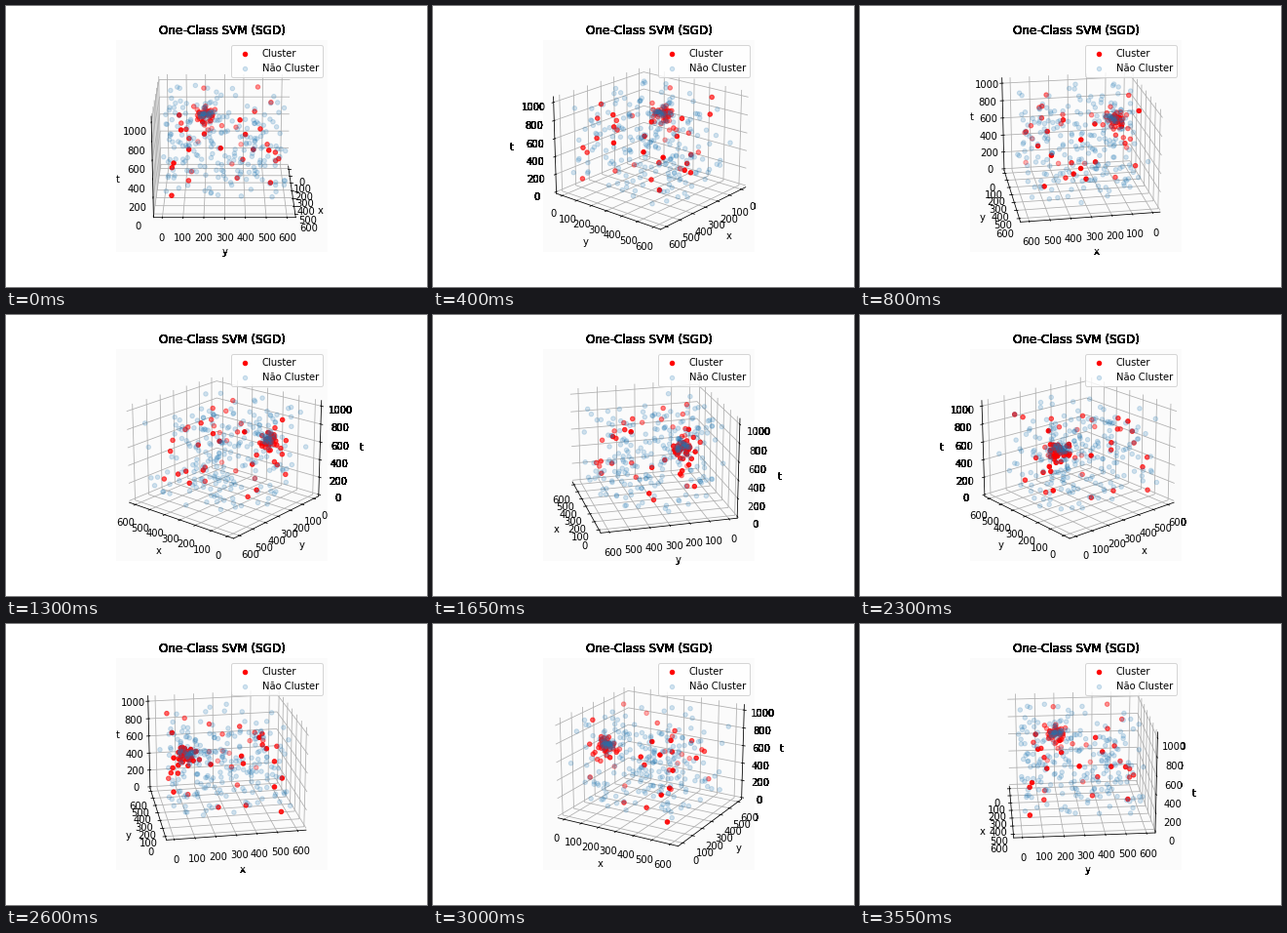
These frames come from a looping animation (432 by 288 pixels, 3.6 s). A matplotlib script:

```python
import numpy as np
import matplotlib.pyplot as plt
from matplotlib.animation import FuncAnimation
from mpl_toolkits.mplot3d import Axes3D

FRAMES = 72
STEP = 360 / FRAMES
ELEV = 20
BOLD_PASSES = 14


class BoldEdgeAxes(Axes3D):
    """3D axes whose text turns bold where it leaves the background box."""

    def draw(self, renderer):
        inner = [*self.collections, self.get_legend()]
        for artist in inner:
            artist.set_visible(False)
        super().draw(renderer)
        # Stack the text; the next full draw covers what lies inside the box.
        for text in self.edge_texts() * BOLD_PASSES:
            text.draw(renderer)
        for artist in inner:
            artist.set_visible(True)
        super().draw(renderer)

    def edge_texts(self):
        texts = [self.title]
        for axis in (self.xaxis, self.yaxis, self.zaxis):
            texts.append(axis.label)
            texts += [tick.label1 for tick in axis.majorTicks]
        return texts


def make_points(rng):
    core = rng.normal((100, 200, 700), (25, 25, 50), (30, 3))
    halo = rng.normal((105, 200, 660), (38, 38, 105), (16, 3))
    strays = rng.uniform((15, 15, 100), (585, 585, 1000), (34, 3))
    noise = rng.uniform((2, 2, 30), (598, 598, 1000), (215, 3))
    mixed = rng.normal((100, 200, 700), (25, 25, 50), (28, 3))
    return np.vstack([strays, core, halo]), np.vstack([noise, mixed])


def style_axes(ax):
    ax.set_facecolor("#fbfbfb")
    ax.set(xlim=(-37, 642), ylim=(-42, 642), zlim=(-20, 1061),
           xlabel="x", ylabel="y", zlabel="t")
    ax.set_xticks(range(0, 601, 100))
    ax.set_yticks(range(0, 601, 100))
    ax.set_zticks(range(0, 1001, 200))
    for axis in (ax.xaxis, ax.yaxis, ax.zaxis):
        axis.set_pane_color((1, 1, 1, 0))
    ax.set_title("One-Class SVM (SGD)")
    ax.legend(loc="upper right")


plt.rcParams.update({"font.family": "DejaVu Sans", "font.size": 10})
fig = plt.figure(figsize=(6, 4), dpi=72, facecolor="white")
fig.subplots_adjust(left=0.125, right=0.9, bottom=0.125, top=0.88)
ax = fig.add_subplot(axes_class=BoldEdgeAxes)
ax.computed_zorder = False

cluster, others = make_points(np.random.default_rng(7))
ax.scatter(*cluster.T, color="red", label="Cluster")
ax.scatter(*others.T, color="tab:blue", alpha=0.2, label="Não Cluster")
style_axes(ax)


def update(i):
    azim = i * STEP
    # A tiny nudge decides the axis side when a wall is seen edge-on.
    nudge = 1e-3 * np.cos(np.radians(azim + 45))
    ax.view_init(elev=ELEV, azim=azim + nudge)
    return []


anim = FuncAnimation(fig, update, frames=FRAMES, init_func=lambda: update(0),
                     interval=50, repeat=True, repeat_delay=0, blit=False)
plt.show()
```
